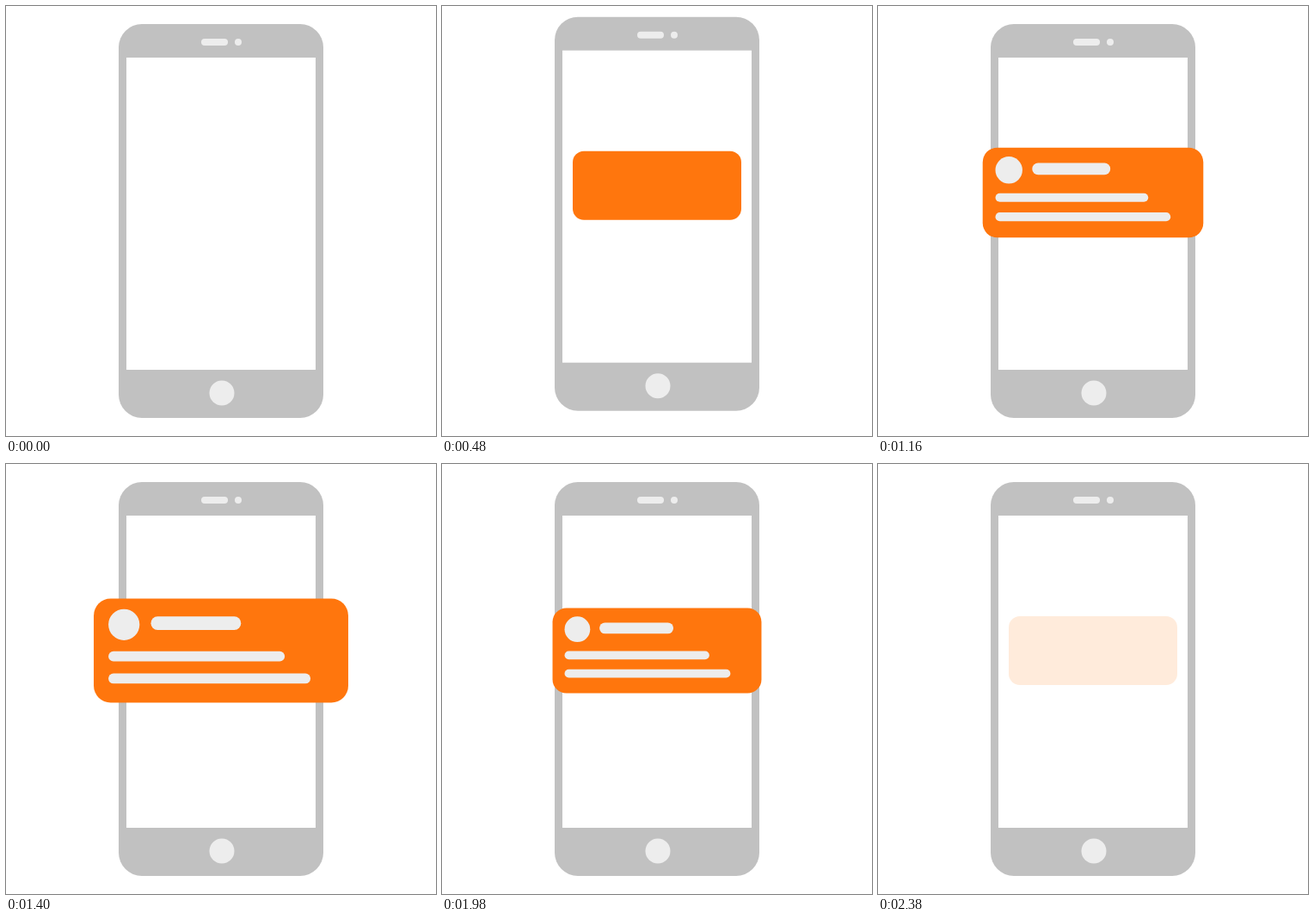
Animation, 500 px wide and 500 px high, one loop 2400 ms. Source, as an HTML page:

```html
<!DOCTYPE html>
<html lang="en">
<head>
<meta charset="utf-8">
<title>Phone notification</title>
<style>
  html, body { margin: 0; width: 100%; height: 100%; overflow: hidden; background: #fff; }
  svg { display: block; width: 100%; height: 100%; }
  .light { fill: #ededed; }
</style>
</head>
<body>
<svg viewBox="0 0 500 500">
  <g id="phone">
    <rect x="131" y="21" width="238" height="458" rx="27" fill="#c1c1c1"/>
    <rect x="140" y="60" width="220" height="363" fill="#fff"/>
    <rect class="light" x="227" y="38" width="31" height="8" rx="4"/>
    <circle class="light" cx="270" cy="42" r="4"/>
    <circle class="light" cx="251" cy="450" r="14.5"/>
    <g id="card">
      <rect x="152" y="177" width="196" height="80" rx="13" fill="#ff760d"/>
      <circle id="avatar" class="light" cx="175.3" cy="197" r="12"/>
      <rect id="title" class="light" x="196" y="190.7" height="10.4" rx="5.2"/>
      <rect id="line1" class="light" x="163.3" y="217.5" height="7.8" rx="3.9"/>
      <rect id="line2" class="light" x="163.3" y="234.6" height="7.8" rx="3.9"/>
    </g>
  </g>
</svg>
<script>
const LOOP = 2400;
const linear = p => p;
const smooth = p => (1 - Math.cos(Math.PI * p)) / 2;
const cubicOut = p => 1 - (1 - p) ** 3;

// Each track is a list of [time, value, easing into this key].
const tracks = {
  lift: [[160, 0], [300, -10, smooth], [400, -10], [700, 0, smooth]],
  tilt: [[160, 0], [290, -2, smooth], [400, 2, smooth], [480, 0, smooth]],
  slide: [[214, 79], [480, 0, smooth]],
  fade: [[214, 0], [480, 1], [2270, 1], [2400, 0]],
  scale: [[1074, 1], [1400, 1.51, cubicOut], [1820, 1.51], [2130, 1, smooth]],
  avatar: [[700, 0], [800, 12, smooth], [2200, 12], [2270, 0, smooth]],
  title: [[760, 0], [888, 69.4], [2180, 69.4], [2250, 0]],
  line1: [[858, 0], [970, 135.8], [2150, 135.8], [2220, 0]],
  line2: [[970, 0], [1085, 155.6], [2120, 155.6], [2190, 0]]
};

function at(keys, t) {
  if (t <= keys[0][0]) return keys[0][1];
  for (let i = 1; i < keys.length; i++) {
    const [t0, v0] = keys[i - 1];
    const [t1, v1, ease = linear] = keys[i];
    if (t < t1) return v0 + (v1 - v0) * ease((t - t0) / (t1 - t0));
  }
  return keys[keys.length - 1][1];
}

const el = id => document.getElementById(id);
const set = (id, name, value) => el(id).setAttribute(name, value);

function draw(t) {
  const v = name => at(tracks[name], t);
  set("phone", "transform", `translate(0 ${v("lift")}) rotate(${v("tilt")} 250 250)`);
  set("card", "transform", `translate(250 ${217 + v("slide")}) scale(${v("scale")}) translate(-250 -217)`);
  set("card", "opacity", v("fade"));
  set("avatar", "r", v("avatar"));
  for (const id of ["title", "line1", "line2"]) set(id, "width", v(id));
}

const start = performance.now();
function tick(now) {
  draw(Math.max(0, now - start) % LOOP);
  requestAnimationFrame(tick);
}
draw(0);
requestAnimationFrame(tick);
</script>
</body>
</html>
```
